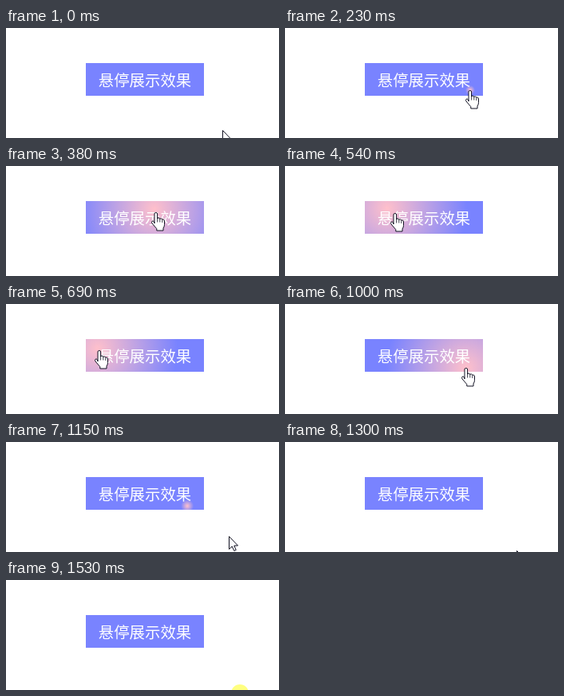
Write an HTML page that moves like this. It is 342x138 px and loops after 1.61 s.

```html
<!DOCTYPE html>
<html lang="zh-CN">
<head>
<meta charset="utf-8">
<style>
  html, body { margin: 0; width: 100%; height: 100%; overflow: hidden; background: #fff; }
  #button {
    position: absolute; left: 100px; top: 44px; width: 148px; height: 41px;
    overflow: hidden; background: #7983ff; color: #fff;
    font: 19.4px/41px "Noto Sans CJK SC", "Noto Sans CJK", sans-serif;
    text-align: center; white-space: nowrap;
  }
  #glow {
    position: absolute; transform: translate(-50%, -50%);
    background: radial-gradient(circle closest-side, pink, transparent);
  }
  #label { position: relative; }
  svg { position: absolute; left: 0; top: 0; width: 342px; height: 138px; }
  #hand, #arrow { fill: #fff; stroke: #111122; stroke-linejoin: round; }
  #click { fill: #ffff80; }
</style>
</head>
<body>
<div id="button"><div id="glow"></div><span id="label">悬停展示效果</span></div>
<svg viewBox="0 0 342 138">
  <circle id="click" cx="293" cy="142" r="11"/>
  <g id="arrow"><path d="M.5 .5V16.5L4.2 13L6.8 18.5L9.2 17.5L6.8 12H11.5Z"/></g>
  <g id="hand"><path d="M-2 14V2Q-2 .5 -.2 .5T1.6 2V8Q1.6 6.8 3.2 7T4.8 8.8Q5 7.6 6.4 7.9T7.8 9.6Q8 8.7 9.2 9T10.5 11V15.5Q10.5 18 9 20V23H.8V20.7L-5 14Q-6 12.2 -5 11.3T-2.6 11.8Z"/>
    <path fill="none" stroke-width=".8" d="M1.6 8V12.5M4.8 9V12.5M7.8 10V13"/></g>
</svg>
<script>
  const LOOP = 1610, ENTER = 215, LEAVE = 1018, FADE = 200, GLOW_SIZE = 200;
  // Paths: time, x, y
  const pointerPath = [
    [0, 271, 128], [150, 251, 98], [230, 232, 78], [380, 188, 58],
    [540, 138, 59], [690, 117, 58], [770, 160, 62], [840, 214, 68],
    [920, 224, 76], [1000, 227, 80], [1070, 270, 104], [1150, 279, 118],
    [1230, 287, 130], [1380, 293, 142], [LOOP, 293, 142]
  ];
  const glowPath = [
    [0, 232, 78], [230, 232, 78], [380, 186, 54], [540, 128, 53], [690, 115, 56],
    [840, 197, 55], [1000, 227, 80], [LOOP, 227, 80]
  ];
  const byId = id => document.getElementById(id);
  const clamp = v => Math.min(1, Math.max(0, v));

  function pointOn(path, t) {
    const i = path.findIndex(p => p[0] > t);
    const [t0, x0, y0] = path[i - 1], [t1, x1, y1] = path[i];
    const k = (t - t0) / (t1 - t0);
    return [x0 + (x1 - x0) * k, y0 + (y1 - y0) * k];
  }

  // CSS "ease": cubic-bezier(.25, .1, .25, 1), solved by bisection
  function ease(x) {
    const bezier = (s, a, b) => 3 * s * (1 - s) ** 2 * a + 3 * s * s * (1 - s) * b + s ** 3;
    let low = 0, high = 1;
    for (let n = 0; n < 20; n++) {
      const mid = (low + high) / 2;
      if (bezier(mid, .25, .25) < x) low = mid; else high = mid;
    }
    return bezier(low, .1, 1);
  }

  // The picture advances 21 times per loop, on multiples of 10 ms
  const tickStart = i => i === 1 ? 70 : Math.round(i * 23 / 3) * 10;
  function snap(t) {
    let i = 0;
    while (i < 20 && tickStart(i + 1) <= t) i++;
    return tickStart(i);
  }

  function draw(t) {
    const [x, y] = pointOn(pointerPath, t);
    const [glowX, glowY] = pointOn(glowPath, t);
    const hovered = t >= ENTER && t < LEAVE;
    const size = GLOW_SIZE * (ease(clamp((t - ENTER) / FADE)) - ease(clamp((t - LEAVE) / FADE)));
    Object.assign(byId("glow").style, {
      left: glowX - 100 + "px", top: glowY - 44 + "px",
      width: size + "px", height: size + "px"
    });
    for (const id of ["hand", "arrow"]) {
      byId(id).setAttribute("transform", `translate(${Math.round(x)} ${Math.round(y)})`);
      byId(id).style.display = (id === "hand") === hovered ? "" : "none";
    }
    byId("click").style.display = t >= 1530 ? "" : "none";
  }

  const start = performance.now();
  function frame() {
    draw(snap((performance.now() - start) % LOOP));
    requestAnimationFrame(frame);
  }
  frame();
</script>
</body>
</html>
```
